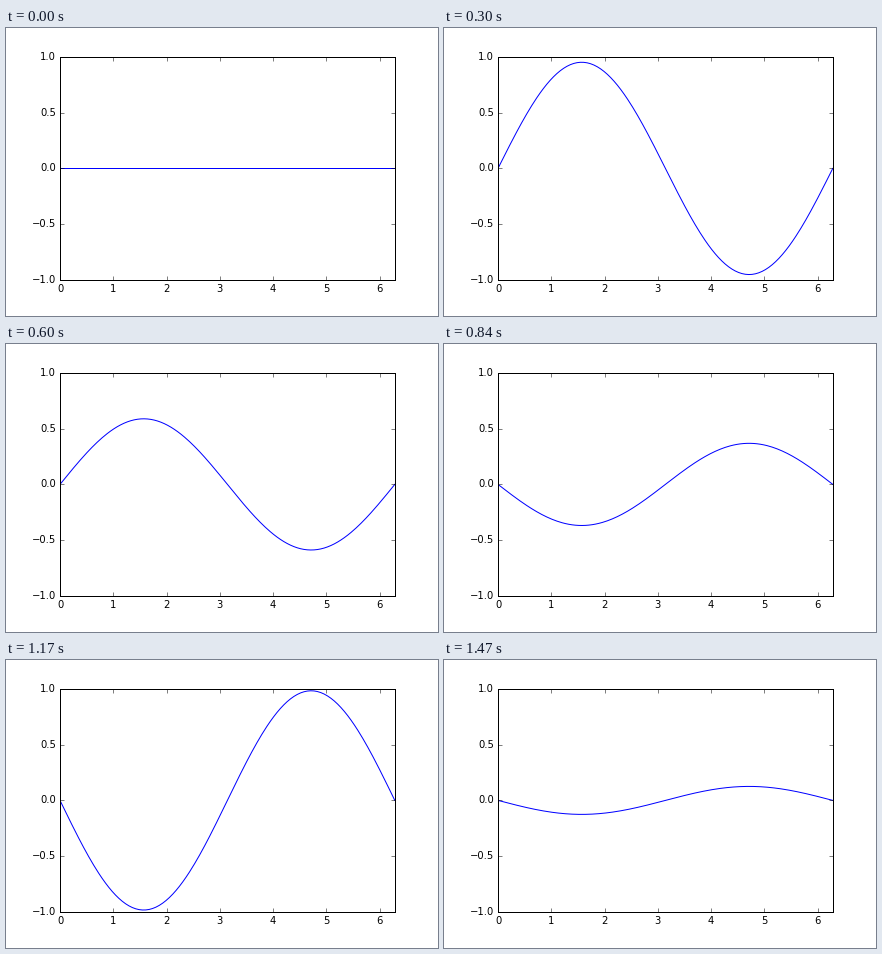
These frames come from a looping animation (432x288 px, 1.5 s). A matplotlib script:

```python
import numpy as np
import matplotlib.pyplot as plt
from matplotlib.animation import FuncAnimation

FRAMES = 50
INTERVAL = 30  # ms
TAU = 2 * np.pi

plt.style.use("classic")
plt.rcParams.update({
    "font.family": "DejaVu Sans",
    "font.size": 10,
    "axes.labelsize": 10,
    "xtick.labelsize": 10,
    "ytick.labelsize": 10,
    "figure.dpi": 72,
    "savefig.dpi": 72,
    "figure.facecolor": "white",
    "savefig.facecolor": "white",
})

fig, ax = plt.subplots(figsize=(6, 4), dpi=72)
fig.subplots_adjust(left=0.125, right=0.9, bottom=0.125, top=0.9)
ax.set_xlim(0, TAU)
ax.set_ylim(-1, 1)
ax.set_xticks(range(7))
ax.set_yticks(np.linspace(-1, 1, 5))

x = np.linspace(0, TAU, 200)
line, = ax.plot(x, np.zeros_like(x), color="blue", linewidth=1)


def draw(i):
    """Standing wave: the amplitude swings through one full period per loop."""
    line.set_ydata(np.sin(TAU * i / FRAMES) * np.sin(x))
    return line,


anim = FuncAnimation(fig, draw, frames=FRAMES, interval=INTERVAL,
                     repeat=True, repeat_delay=0)
plt.show()
```
